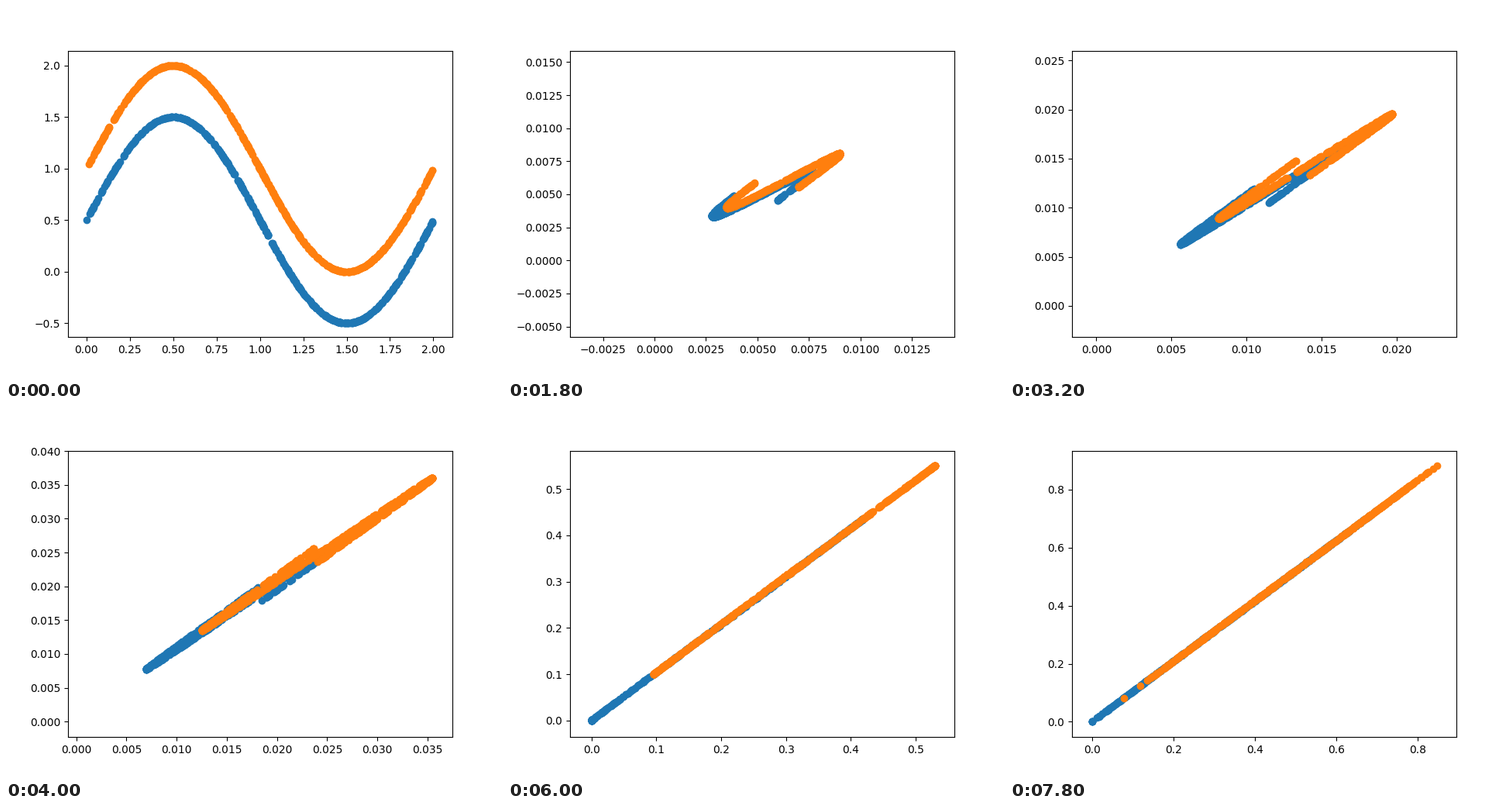
Recreate the animation shown at these times as a matplotlib script. Size 640 by 480 pixels, loop 8 s.

```python
import numpy as np
import matplotlib.pyplot as plt
from matplotlib.animation import FuncAnimation

FRAMES, STEP_MS = 40, 200
POINTS = 500
AX_SIZE = np.array([496.0, 369.6])
MARK_PAD = 3.0


def scale_at(step):
    """Reach of the upper cloud: slow growth, a burst, then a plateau."""
    steps = [1, 9, 16, 20, 26, 30, 34]
    reach = [0.0048, 0.009, 0.0197, 0.0355, 0.203, 0.53, 0.848]
    return np.exp(np.interp(step, steps, np.log(reach)))


def wave(rng, lift):
    x = rng.uniform(0, 2, POINTS)
    return x, np.sin(np.pi * x) + lift


def embed(step, x, y, rng):
    """Fold the wave towards a straight line as training goes on."""
    age = max(step - 9, 0)
    bend = 0.037 * np.exp(-age / 5)
    slope = 0.283 + bend + 0.137 / (1 + np.exp((12.5 - age) / 2))
    tilt = 0.02 - 0.135 * np.exp(-age / 6)
    ratio = 1.042 - 0.07 * np.exp(-age / 5)

    drop = 2 - y
    u = 1 - slope * drop + bend * drop**2 + tilt * (x - 0.5)

    # Late steps pull the cloud to its middle and blur it along the line.
    late = np.clip((step - 34) / 5, 0, 1)
    u = 0.5 + (u - 0.5) * (1 - 0.2 * late)
    u += 0.055 * late * rng.standard_normal(len(x))

    scale = scale_at(step)
    u = scale * np.clip(u, 0, 1)
    split = 0.0012 * min(scale / 0.009, 1)
    v = ratio * u + split * (x - 1.05)
    return np.stack([u, np.maximum(v, 0)], axis=1)


def clouds(step):
    rng = np.random.default_rng(100 + step)
    waves = [wave(rng, lift) for lift in (0.5, 1.0)]
    if step == 0:
        return [np.stack(w, axis=1) for w in waves]
    return [embed(step, *w, rng) for w in waves]


def widen(lo, hi):
    margin = 0.05 * (hi - lo)
    return lo - margin, hi + margin


def limits(low, high):
    """Marker-padded bounds of both clouds plus a five percent margin."""
    pad = MARK_PAD / AX_SIZE
    lo, hi = low.min(0) - pad, low.max(0) + pad
    a, b = widen(lo, hi)
    pad = pad * (b - a)
    return widen(np.minimum(lo, high.min(0) - pad),
                 np.maximum(hi, high.max(0) + pad))


fig, ax = plt.subplots(figsize=(6.4, 4.8), dpi=100)
dots = [ax.scatter([], [], color=c) for c in ("C0", "C1")]


def draw(step):
    data = clouds(step)
    for dot, pts in zip(dots, data):
        dot.set_offsets(pts)
    lo, hi = limits(*data)
    ax.set_xlim(lo[0], hi[0])
    ax.set_ylim(lo[1], hi[1])
    return dots


def init():
    return draw(0)


anim = FuncAnimation(fig, draw, frames=FRAMES, interval=STEP_MS,
                     init_func=init, repeat=True, repeat_delay=0, blit=False)
plt.show()
```
